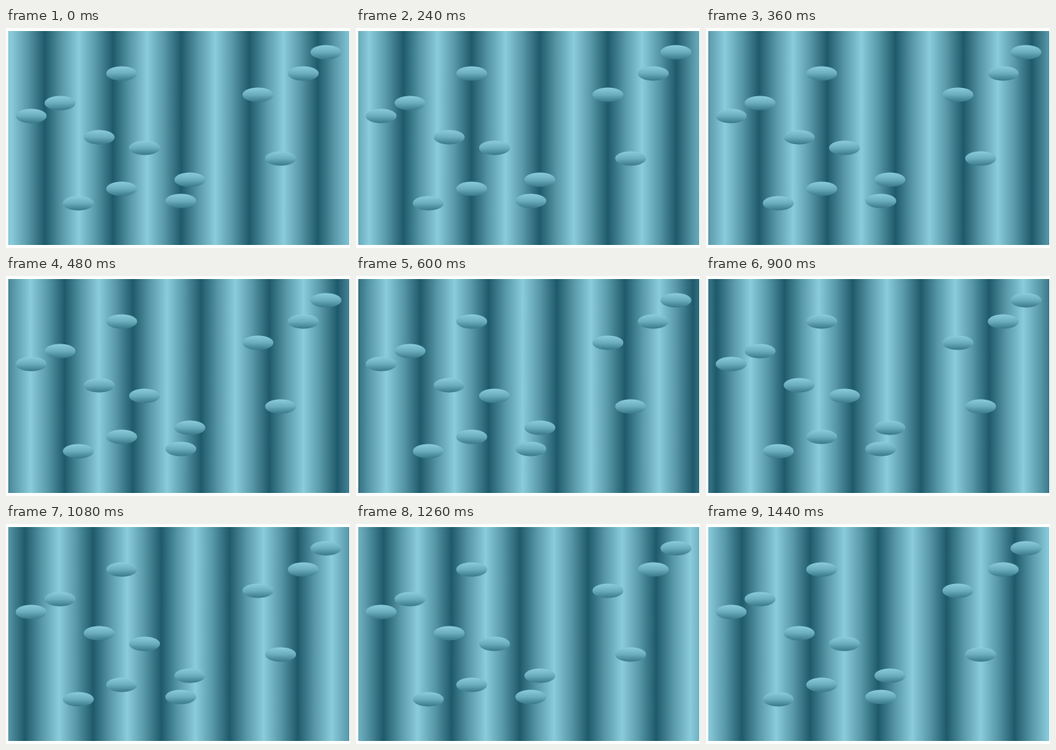
An HTML page that plays this animation: 452 by 290 pixels, repeating every 1500 ms.

```html
<!DOCTYPE html>
<html lang="en">
<head>
<meta charset="utf-8">
<title>Sliding bands</title>
<style>
  html, body { margin: 0; width: 100%; height: 100%; overflow: hidden; background: #fff; }
  svg { display: block; }
</style>
</head>
<body>
<svg width="452" height="290" viewBox="0 0 452 290">
  <defs>
    <linearGradient id="bands" gradientUnits="userSpaceOnUse" x1="6.2" x2="51" spreadMethod="reflect">
      <stop offset="0" stop-color="#8accdc"/>
      <stop offset=".5" stop-color="#5898a8"/>
      <stop offset="1" stop-color="#1e5a6b"/>
    </linearGradient>
    <linearGradient id="shade" x2="0" y2="1">
      <stop offset="0" stop-color="#8accdc"/>
      <stop offset=".5" stop-color="#6badbd"/>
      <stop offset="1" stop-color="#387888"/>
    </linearGradient>
    <ellipse id="pebble" rx="20.3" ry="9.5" fill="url(#shade)"/>
  </defs>
  <rect x="3" y="4" width="448" height="282" fill="url(#bands)"/>
  <g id="pebbles"></g>
</svg>
<script>
  const PERIOD = 89.6, STEP_MS = 60, STEPS = 25;
  const bands = document.getElementById('bands');
  const pebbles = document.getElementById('pebbles');

  function addPebble(x, y) {
    pebbles.insertAdjacentHTML('beforeend', `<use href="#pebble" x="${x}" y="${y}"/>`);
  }

  // One pebble per grid row, then a few loose ones.
  [13, 12, 10, 0, 3, 11, 7, 6.6].forEach((column, row) =>
    addPebble(33 + column * 29.8, 32 + row * 28));
  [[152, 60], [71, 99], [182, 158], [152, 212], [95, 231]].forEach(([x, y]) => addPebble(x, y));

  // The starting pose holds for two steps; the bands then advance evenly.
  function draw(ms) {
    const step = Math.floor(ms / STEP_MS) % STEPS;
    const shift = Math.max(0, step - 1) * PERIOD / (STEPS - 1);
    bands.setAttribute('gradientTransform', `translate(${shift})`);
  }

  const start = performance.now();
  function tick() {
    draw(performance.now() - start);
    requestAnimationFrame(tick);
  }
  tick();
</script>
</body>
</html>
```
